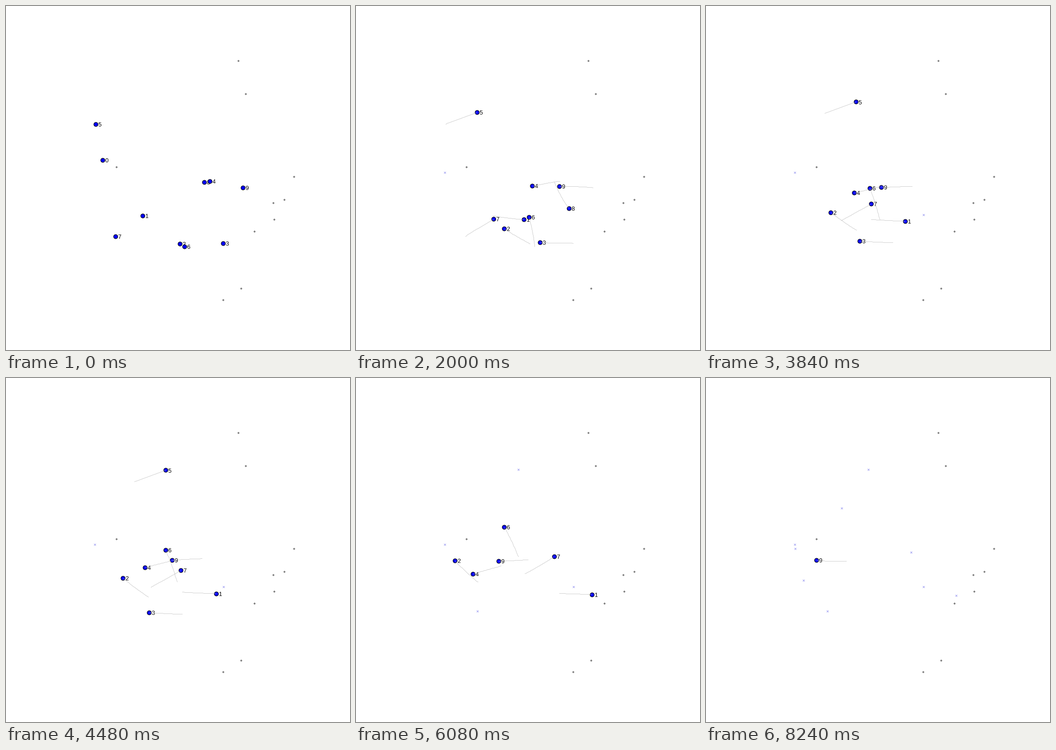
A matplotlib script for the animation above (8.32 s loop, 748 by 748 pixels).

```python
import matplotlib.pyplot as plt
import numpy as np
from matplotlib.animation import FuncAnimation

SIZE, DPI = 748, 100
FRAMES, INTERVAL, TRAIL = 104, 80, 25
REACH = 5.5    # an agent stops this close to its goal
PX = 72 / DPI  # one pixel in points

# Per agent: travel time in frames, then key points evenly spaced in time,
# from the start to the goal.
TRIPS = [
    (13.4, (210, 335.5), (193, 362)),
    (88.4, (297, 456), (378.8, 465.5), (466, 469.3), (544, 473)),
    (88.7, (378, 517), (312.6, 478.3), (248, 429.5), (194, 371)),
    (72.5, (472, 516), (368.4, 513.3), (264, 507)),
    (100, (443, 381), (362, 397), (275.5, 420), (212, 440)),
    (58, (195, 257), (274.5, 227.5), (353, 199)),
    (95.3, (388.5, 523), (371.5, 441), (338.5, 355), (295, 283)),
    (82, (238, 501), (305.5, 460.5), (377.5, 420.5), (446, 379)),
    (30.5, (431.5, 383), (448.5, 418), (473, 454)),
    (106, (515.5, 395), (415, 393.3), (324, 398), (233, 396)),
]
POSTS = [(505, 119), (521, 191), (240, 350), (626, 371), (605, 421),
         (581, 428), (583, 464), (540, 490), (511, 614), (472, 639)]


def route(duration, points):
    """Smooth curve through the key points, one whole pixel per frame."""
    stops = np.linspace(0, 1, len(points))
    t = np.minimum(np.arange(FRAMES) / duration, 1)
    axes = [np.polyval(np.polyfit(stops, c, len(points) - 1), t)
            for c in np.transpose(points)]
    return np.floor(np.column_stack(axes) + 1e-6), np.column_stack(axes)


fig = plt.figure(figsize=(SIZE / DPI, SIZE / DPI), dpi=DPI, facecolor="white")
ax = fig.add_axes([0, 0, 1, 1])
ax.set_xlim(-0.5, SIZE - 0.5)
ax.set_ylim(SIZE - 0.5, -0.5)
ax.axis("off")

ax.plot(*np.transpose(POSTS), "D", color="#7c7c7c", ms=3.5 * PX, mew=0, zorder=1)


class Agent:
    def __init__(self, name, duration, *points):
        self.pixels, exact = route(duration, points)
        goal = points[-1]
        self.alive = np.hypot(*(exact - goal).T) > REACH
        self.label = ax.text(0, 0, name, family="Liberation Sans",
                             size=12.5 * PX, color="black", zorder=2)
        self.dot, = ax.plot([], [], "o", mfc="#0000ff", mec="black",
                            ms=9 * PX, mew=1.1 * PX, zorder=3)
        self.trail, = ax.plot([], [], color="#b2b2b2", alpha=0.75,
                              lw=0.8 * PX, zorder=4)
        self.cross, = ax.plot(*goal, "x", color="#9c9cf0", ms=5 * PX,
                              mew=PX, zorder=1)

    def show(self, n):
        alive = self.alive[n]
        for part in (self.label, self.dot, self.trail):
            part.set_visible(alive)
        self.cross.set_visible(not alive)
        x, y = self.pixels[n]
        self.dot.set_data([x], [y])
        self.label.set_position((x + 4.8, y + 5))
        self.trail.set_data(*self.pixels[max(0, n - TRAIL):n + 1].T)


agents = [Agent(str(i), *trip) for i, trip in enumerate(TRIPS)]


def draw(n):
    for agent in agents:
        agent.show(n)
    return []


anim = FuncAnimation(fig, draw, frames=FRAMES, interval=INTERVAL,
                     repeat=True, repeat_delay=0, blit=False)
plt.show()
```
